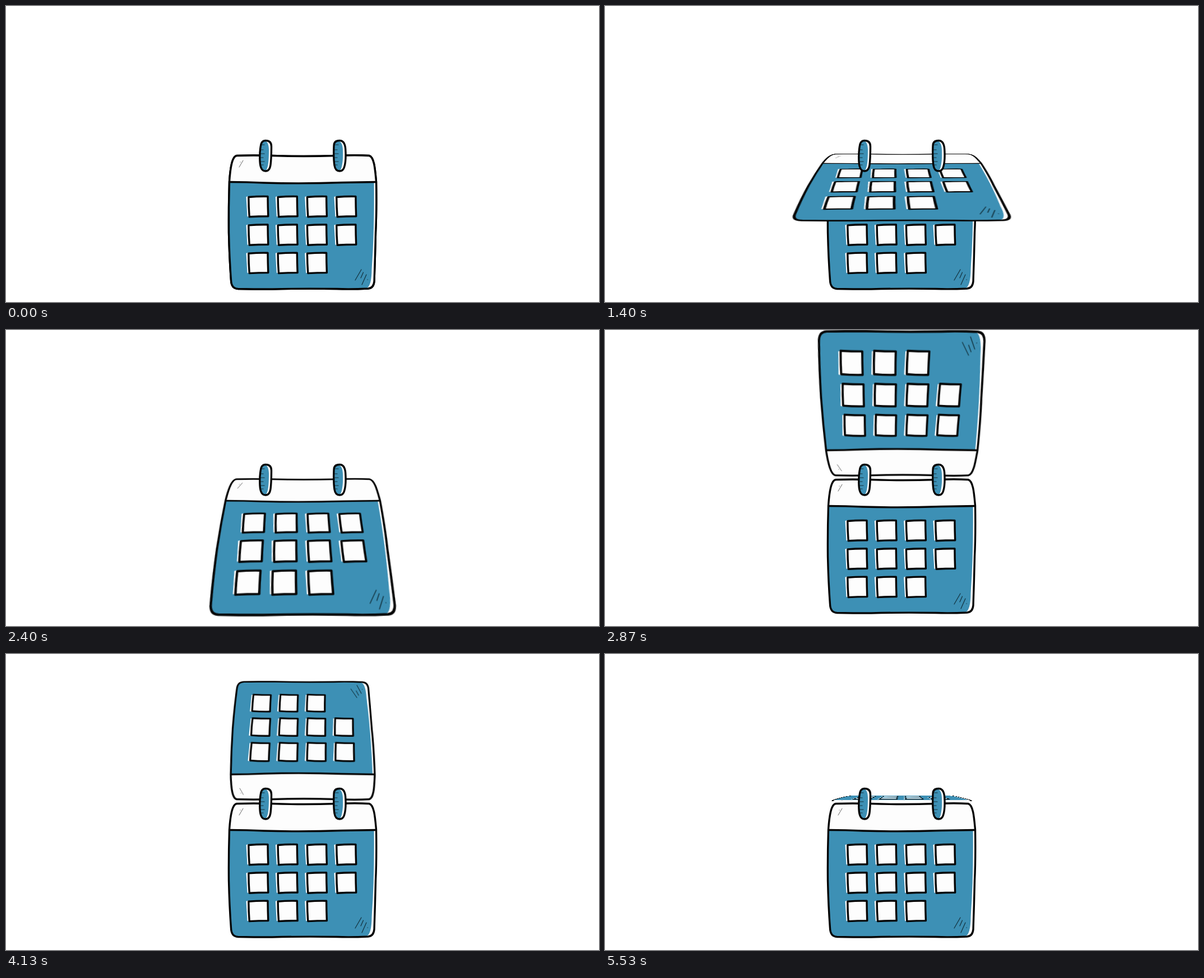
Animation, 1058 px wide and 529 px high, one loop 5.59 s. Source, as an HTML page:

```html
<!DOCTYPE html>
<html lang="en">
<head>
<meta charset="utf-8">
<title>Calendar flip</title>
<style>
  html, body { margin: 0; width: 100%; height: 100%; overflow: hidden; background: #fff; }
  #stage { position: relative; width: 1058px; height: 529px; overflow: hidden; }
  svg { position: absolute; left: 0; top: 0; width: 1058px; height: 529px; overflow: visible; }
  #flip { transform-origin: 529px 263.5px; }
  .ink { fill: none; stroke: #050505; stroke-width: 3.4; stroke-linecap: round; stroke-linejoin: round; }
  .thin { stroke-width: 1.2; stroke: #12303c; }
  .faint { stroke-width: 1; stroke: #666; }
  .blue { fill: #3d90b5; }
  .paper { fill: #fdfdfd; }
</style>
</head>
<body>
<div id="stage">
  <svg id="base" viewBox="0 0 1058 529"></svg>
  <svg id="flip" viewBox="0 0 1058 529"></svg>
  <svg id="rings" viewBox="0 0 1058 529"></svg>
</div>
<script>
const FRAME = 200 / 3;      // 15 steps per second
const LOOP = 5590;
const TURN = 16.93;         // steps per page turn
const LENS = 650;           // viewing distance in px

// Page angle over one turn: [step, degrees]
const swing = [
  [0, 0], [1.21, 19], [2.14, 39.2], [4.07, 71.3], [8, 133.8], [9, 155], [10.07, 173],
  [11.21, 194.8], [12.21, 215], [13.3, 236], [15.3, 267], [TURN, 300]
];

const path = (cls, d) => `<path class="${cls}" d="${d}"/>`;

function dayBox(col, row) {
  const x = 432.5 + col * 52.3, y = 341 + row * 50.4;
  return `<g transform="translate(${x} ${y})">` +
    path('paper', 'M-4 0 L0 -1 L2 36 L-2 35 Z') +
    path('paper', 'M0 0 L35 -1 L35.5 35 L1.5 36 Z') +
    path('ink', 'M.3 .5 Q18 -1 34.5 -.6 Q34.6 18 35.3 34.8 Q18 34.8 1.7 35.8 Q.4 18 .3 .5 Z') + '</g>';
}

function page() {
  const outline = 'M412 267.5 Q440 266.5 475 267.5 Q530 269.5 590 267.5 Q625 266 648 267.5' +
    ' C657 270 658.5 292 660.5 314 C661 345 661 375 659.5 405 Q658.5 450 657 492' +
    ' Q656 504 646 505 Q615 506.5 590 505.5 Q530 504.5 475 506 Q440 506 414 505.5' +
    ' Q402 505 401.5 490 Q398.5 450 397.5 405 Q397 360 398.5 314 C400 292 403 268 412 267.5 Z';
  const body = 'M398.5 314 Q530 319 656.5 315 Q657.5 400 652.5 470 Q652.5 500 643 505' +
    ' Q530 504 414 505.5 Q402 505 401.5 490 Q398.5 450 397.5 405 Q397 360 398.5 314 Z';
  let days = '';
  for (let i = 0; i < 11; i++) days += dayBox(i % 4, Math.floor(i / 4));
  return path('paper', outline) + path('blue', body) + path('ink', outline) +
    path('ink', 'M399 314.5 Q430 314.5 460 316 Q530 318 600 315.5 L660 314.5') + days +
    path('ink thin', 'M634 471 L623 490 M637.5 476 L633 486 M643 480 L635 498 M645 489 h.5') +
    path('ink faint', 'M423 276 L416 288 M418 279 h.4');
}

function ring(shape, fill, left) {
  let ticks = '';
  [248, 257, 264, 271, 278, 284].forEach((y, i) => ticks += `M${left} ${y} h${i % 2 ? 5 : 7} `);
  return path('paper', shape) + path('blue', fill) + path('ink thin', ticks) + path('ink', shape);
}

const rings =
  ring('M463 240.5 C470 240.5 473.5 244 473.5 251 C473.5 262 473.5 272 472 284 C471 291 468 295 463 295' +
       ' C456 295 453.5 289 453 278 C452.5 268 453 256 455 247 C456.5 242 459 240.5 463 240.5 Z',
       'M461 241 C467 242 469 248 469 258 C469 270 468.5 282 466.5 288 Q465 294 461 295' +
       ' C455 293 453.5 287 453 278 C452.5 268 453 256 455 247 Q457 242 461 241 Z', 454) +
  ring('M595 240.5 C602 240.5 605.5 246 605.8 258 C606.5 270 606 280 603.5 288 C602 293 599 295 595 295' +
       ' C590 295 587 291 586 285 C584.5 275 584.5 262 585 250 C585 243 589 240.5 595 240.5 Z',
       'M593 241 C599 243 601 249 601 260 C601.5 272 600.5 282 598.5 289 Q597 294 594 295' +
       ' C590 295 587 291 586 285 C584.5 275 584.5 262 585 250 Q586 242 593 241 Z', 586);

const byId = id => document.getElementById(id);
const flip = byId('flip');
byId('base').innerHTML = page();
flip.innerHTML = page();
byId('rings').innerHTML = rings;

function angleAt(step) {
  const i = swing.findIndex(([s]) => s > step);
  const [s0, a0] = swing[i - 1], [s1, a1] = swing[i];
  return a0 + (a1 - a0) * (step - s0) / (s1 - s0);
}

function draw(now) {
  const step = Math.floor((now % LOOP + 3.4) / FRAME);
  const angle = angleAt(step % TURN);
  // Past the horizontal the page is hidden behind the fixed one
  flip.style.visibility = angle > 271 ? 'hidden' : 'visible';
  flip.style.transform = `perspective(${LENS}px) rotateX(${angle}deg)`;
}

const start = performance.now();
function tick() {
  draw(performance.now() - start);
  requestAnimationFrame(tick);
}
tick();
</script>
</body>
</html>
```
